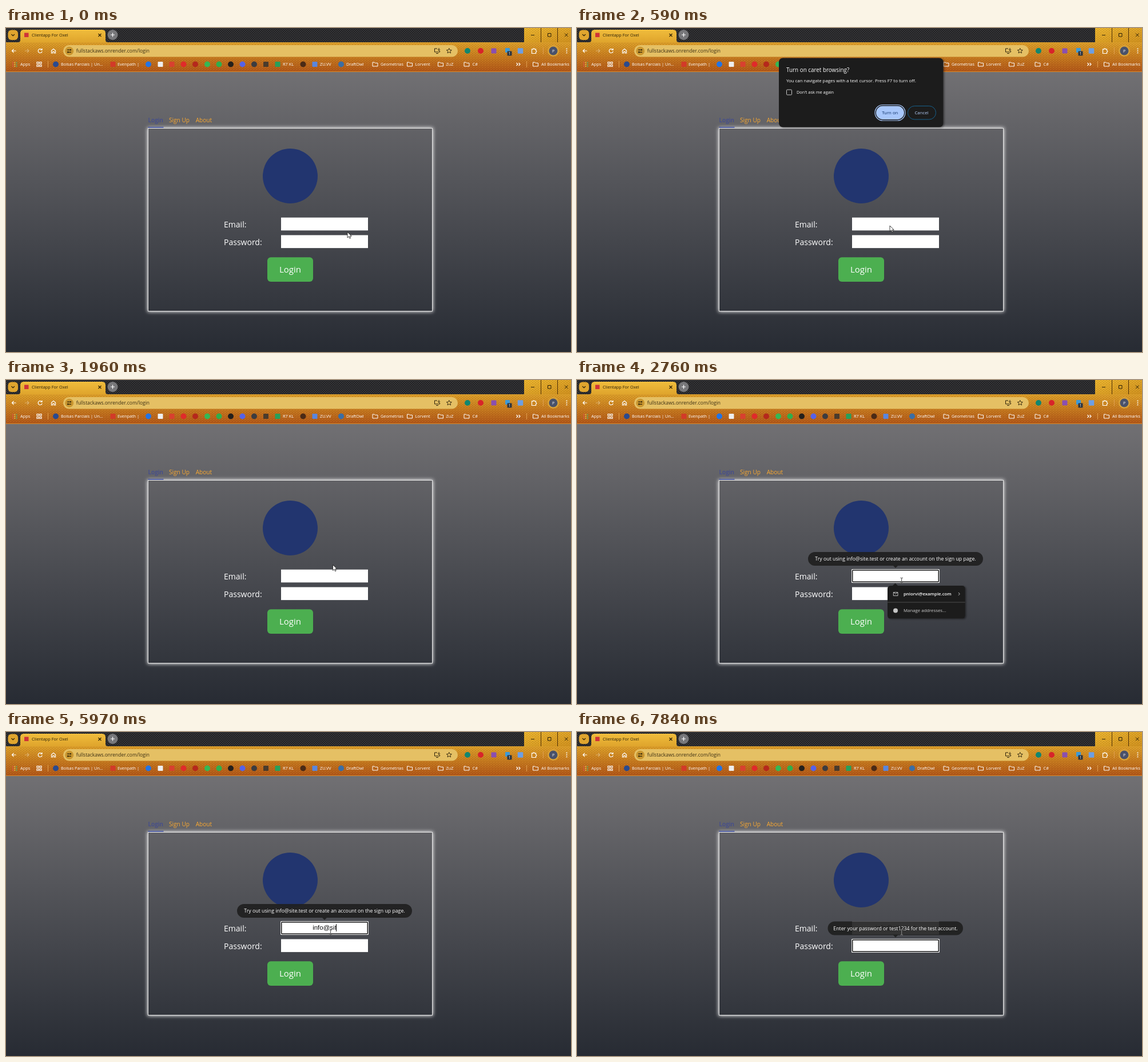
Write an HTML page that moves like this. It is 988 by 567 pixels and loops after 8000 ms.

```html
<!DOCTYPE html>
<html lang="en">
<head>
<meta charset="utf-8">
<title>Login form</title>
<style>
  html, body { margin: 0; width: 100%; height: 100%; overflow: hidden; background: #282c34; }
  svg { display: block; width: 988px; height: 567px; font-family: "Open Sans", "Noto Sans", sans-serif; fill: #fff; }
  .mid { text-anchor: middle; }
  .bar { font-size: 7.35px; font-weight: 500; }
  .line { fill: none; stroke: #fff; stroke-width: 1.2; }
  .ink { stroke: #2b2008; }
  .label { font-size: 14px; font-weight: 500; }
  .nav { font-size: 10.1px; fill: #fba930; font-weight: 500; }
  .tip { font-size: 8.75px; font-weight: 500; }
  .typed { font: 11.5px "Liberation Sans", Arial, sans-serif; fill: #111; }
  #beam { mix-blend-mode: difference; }
</style>
</head>
<body>
<svg viewBox="0 0 988 567">
  <defs>
    <linearGradient id="page" x2="0" y2="1"><stop stop-color="#717073"/><stop offset="1" stop-color="#272b33"/></linearGradient>
    <linearGradient id="gold" x2="0" y2="1"><stop stop-color="#dca02a"/><stop offset=".45" stop-color="#c87e20"/><stop offset="1" stop-color="#b05518"/></linearGradient>
    <linearGradient id="tab" x2="0" y2="1"><stop stop-color="#f0bd3c"/><stop offset="1" stop-color="#dfa42c"/></linearGradient>
    <linearGradient id="win" y2="1"><stop stop-color="#eab52f"/><stop offset="1" stop-color="#d0921f"/></linearGradient>
    <pattern id="weave" width="4" height="4" patternUnits="userSpaceOnUse">
      <rect width="4" height="4" fill="#29292b"/>
      <path d="M0 0h2v1h-2zM2 2h2v1h-2z" fill="#414144"/>
      <path d="M0 1h2v1h-2zM2 3h2v1h-2z" fill="#1b1b1d"/>
    </pattern>
    <pattern id="grain" width="5" height="4" patternUnits="userSpaceOnUse">
      <path d="M0 0h2v1h-2zM2.5 2h2v1h-2z" fill="#5a2600" fill-opacity=".2"/>
      <path d="M2 1h2v1h-2z" fill="#ffb040" fill-opacity=".15"/>
    </pattern>
    <clipPath id="outside"><path clip-rule="evenodd" d="M220 150H780V520H220zM249 176V495H745V176z"/></clipPath>
    <filter id="glow" x="-10%" y="-10%" width="120%" height="120%"><feGaussianBlur stdDeviation="3"/></filter>
    <filter id="shade" x="-10%" y="-10%" width="120%" height="125%"><feDropShadow dy="1" stdDeviation="1.5" flood-opacity=".4"/></filter>
    <path id="folder" d="M-4.5-3.5h3.3l1.2 1.3h4.5v5.7h-9z" class="line" style="stroke-width:1"/>
  </defs>

  <!-- page -->
  <rect y="77" width="988" height="490" fill="url(#page)"/>
  <g clip-path="url(#outside)">
    <rect x="247.5" y="174.5" width="499" height="322" filter="url(#glow)"/>
  </g>
  <rect x="248.5" y="175.5" width="497" height="320" class="line" style="stroke:#e6e6e6;stroke-width:1"/>
  <text class="nav" x="248.5" y="164.5" style="fill:#414b91;font-weight:600">Login</text>
  <text class="nav" x="285" y="164.5">Sign Up</text>
  <text class="nav" x="331.7" y="164.5">About</text>
  <rect x="248.5" y="173" width="27" height="1.5" fill="#33449a"/>
  <circle cx="497" cy="259" r="48" fill="#22356f"/>
  <text class="label" x="381" y="349">Email:</text>
  <text class="label" x="381" y="380">Password:</text>
  <rect x="481" y="331.7" width="152" height="22.6"/>
  <rect x="481" y="362.5" width="152" height="22.6"/>
  <g id="ring">
    <rect x="480" y="331" width="154" height="24" rx="1.5"/>
    <rect x="481.7" y="332.7" width="150.6" height="20.6" rx="1" stroke="#101010" stroke-width="1.5"/>
  </g>
  <text id="typed" class="typed mid" x="557" y="346.3"></text>
  <rect id="caret" width="1" height="13" fill="#111"/>
  <rect x="457" y="401.3" width="80" height="42.7" rx="6" fill="#4caf50"/>
  <text class="label mid" x="497" y="427.5" style="font-size:15px">Login</text>

  <!-- browser frame -->
  <rect width="988" height="25" fill="url(#weave)"/>
  <rect y="25" width="988" height="52" fill="url(#gold)"/>
  <rect y="25" width="988" height="52" fill="url(#grain)"/>
  <rect y="76" width="988" height="1" fill="#d88d30"/>
  <path d="M21 25q4 0 4-4V9q0-6 6-6H168q6 0 6 6V21q0 4 4 4z" fill="url(#tab)"/>
  <rect x="3.5" y="3.5" width="17.5" height="17.5" rx="6" fill="#e0a52e"/>
  <path d="M9.5 11l2.7 2.7 2.7-2.7" class="line ink"/>
  <rect x="32" y="8.5" width="7.5" height="7.5" fill="#cf3438"/>
  <text x="45" y="15.3" font-size="7.4" fill="#2b2008">Clientapp For Oxel</text>
  <path d="M161.5 10l5 5m0-5l-5 5" class="line ink"/>
  <circle cx="186.5" cy="12" r="9" fill="#77777a"/>
  <path d="M183 12h7m-3.5-3.5v7" class="line"/>
  <rect x="906" width="82" height="25" fill="url(#win)"/>
  <rect x="906" width="82" height="25" fill="url(#grain)"/>
  <path d="M935.5 0v25M964.5 0v25" stroke="#4f3006"/>
  <path d="M918 12.5h6M947.5 9.5h5.5v5.5h-5.5zM977 9.5l5.5 5.5m0-5.5l-5.5 5.5" class="line ink" style="stroke-width:1"/>

  <!-- toolbar -->
  <path d="M17.5 40h-7m3-3l-3 3 3 3" class="line"/>
  <path d="M33 40h7m-3-3l3 3-3 3" class="line" opacity=".35"/>
  <path d="M62.5 38a3.5 3.5 0 1 0 .6 3M63 35.8v2.7h-2.7" class="line"/>
  <path d="M79.5 39.5l3.5-3 3.5 3v4.5h-2.2v-2.7h-2.6v2.7h-2.2z" class="line"/>
  <rect x="100" y="30" width="690" height="20.5" rx="10.2" fill="#e5c064"/>
  <circle cx="110.7" cy="40.2" r="7.5" fill="#c9962f"/>
  <path d="M107 38.3h4m-3 4h6" class="line ink"/>
  <circle cx="112.8" cy="38.3" r="1.3" fill="#2b2008"/>
  <circle cx="108.3" cy="42.3" r="1.3" fill="#2b2008"/>
  <text x="122.8" y="43.3" font-size="8.45" fill="#3b2e14">fullstackaws.onrender.com/login</text>
  <path d="M754 36h-4.5v6h9v-2M752 44.5h4M757 35v4.5m-2-2l2 2 2-2" class="line ink" style="stroke-width:1"/>
  <path d="M774.8 35.5l1.3 2.9 3.2.3-2.4 2.1.7 3.1-2.8-1.7-2.8 1.7.7-3.1-2.4-2.1 3.2-.3z" class="line ink" style="stroke-width:.9"/>
  <path d="M919.5 37.2h2.2a1.3 1.3 0 0 1 2.6 0h2.2v2.3a1.3 1.3 0 0 1 0 2.6v2.4h-7z" class="line"/>
  <path d="M939.5 34v12" stroke="#e0a050"/>
  <circle cx="957" cy="40" r="10" fill="#d9a238"/>
  <circle cx="957" cy="40" r="7.5" fill="#49516a"/>
  <text class="mid" x="957" y="42.7" font-size="7">P</text>
  <circle cx="980.5" cy="36.5" r="1"/>
  <circle cx="980.5" cy="40" r="1"/>
  <circle cx="980.5" cy="43.5" r="1"/>
  <g id="bar" class="bar"></g>

  <!-- overlays -->
  <g id="drop">
    <path d="M551.5 360.5l5-5 5 5z" fill="#1f1f1f"/>
    <rect x="543" y="360" width="135.7" height="57.6" rx="5" fill="#1f1f1f" filter="url(#shade)"/>
    <path d="M543 389h135.7" stroke="#4c4c4c"/>
    <path d="M553.3 371.5h7.7v6h-7.7zl3.85 3 3.85-3" class="line" style="stroke:#ccc;stroke-width:.9"/>
    <text x="571" y="377.4" font-size="7.8" font-weight="600">pnlorvi@example.com</text>
    <path d="M667 372l2.3 2.4-2.3 2.4" class="line" style="stroke:#ccc;stroke-width:1"/>
    <circle cx="557" cy="403.5" r="4" fill="#c4c4c4"/>
    <text x="571" y="406.3" font-size="7.8" fill="#ccc">Manage addresses...</text>
  </g>
  <g id="tipEmail" class="tip">
    <path d="M416 301H698a12 12 0 0 1 0 24H561l-4 4-4-4H416a12 12 0 0 1 0-24z" fill="#1f1f1f" fill-opacity=".91"/>
    <text class="mid" x="557" y="316">Try out using info@site.test or create an account on the sign up page.</text>
  </g>
  <g id="tipPass" class="tip">
    <path d="M450.5 331.5H663a12 12 0 0 1 0 24H561l-4 4-4-4H450.5a12 12 0 0 1 0-24z" fill="#1f1f1f" fill-opacity=".91"/>
    <text class="mid" x="557" y="346.5">Enter your password or test1234 for the test account.</text>
  </g>
  <g id="dialog">
    <rect x="353" y="52.5" width="287.5" height="121" rx="7" fill="#1f1f1f" filter="url(#shade)"/>
    <text x="366" y="77" font-size="9.9" font-weight="500">Turn on caret browsing?</text>
    <text x="366" y="95.3" font-size="7.87">You can navigate pages with a text cursor. Press F7 to turn off.</text>
    <rect x="366.5" y="108" width="9" height="9" rx="1.2" class="line" style="stroke:#c7c7c7;stroke-width:1"/>
    <text x="384" y="115.2" font-size="7.35">Don't ask me again</text>
    <rect x="521" y="134.5" width="53" height="27.5" rx="13.7" class="line" style="stroke:#a8c7fa"/>
    <rect x="523" y="136.5" width="49" height="23.5" rx="11.7" fill="#a8c7fa"/>
    <text class="mid" x="547.3" y="151.2" font-size="7.8" fill="#0b2f66">Turn on</text>
    <rect x="578.5" y="136.5" width="49" height="23.5" rx="11.7" class="line" style="stroke:#17608c;stroke-width:1"/>
    <text class="mid" x="602.5" y="151.2" font-size="7.8" fill="#b5cffb">Cancel</text>
  </g>
  <path id="arrow" d="M0 0v10l2.4-2.2 1.6 3.5 1.7-.8-1.6-3.3h3.2z" stroke="#111" stroke-width=".8"/>
  <path id="beam" d="M565.5 346.3h1.3l.9.6.9-.6h1.3M567.7 346.7v8M565.5 355.1h1.3l.9-.6.9.6h1.3" class="line" style="stroke:#c4c4c4;stroke-width:1"/>
</svg>
<script>
const LOOP = 8000;
const $ = id => document.getElementById(id);

// Bookmark bar: discs and squares [x, colour], captions [x, text], folders [x]
const discs = [[87, '#2b4a8e'], [249, '#2274e5'], [310.5, '#e02a2a'], [331, '#b5281c'], [352, '#35b855'],
  [372.5, '#2fae4c'], [393, '#24201c'], [413.5, '#5562e8'], [434, '#3c3c40'], [519.5, '#4a2a16'], [586, '#3b6ea5']];
const squares = [[187, '#d23a28'], [270, '#eeeeee'], [290, '#d8402f'], [454.5, '#4a3b2c'], [475, '#27a05b'], [540, '#5a86dc']];
const captions = [[25, 'Apps'], [96, 'Bolsas Parciais | Un...'], [195, 'Evenpath |'], [484, 'R7 KL'], [549, 'ZU.VV'],
  [595, 'DraftOwl'], [655, 'Geometrias'], [715.5, 'Lorvent'], [769.5, 'ZuZ'], [815.5, 'C#'], [936, 'All Bookmarks']];
const folders = [645.5, 706, 760, 805.5, 926];

const disc = (x, y, r, fill) => `<circle cx="${x}" cy="${y}" r="${r}" fill="${fill}"/>`;
const square = (x, y, s, fill) => `<rect x="${x - s / 2}" y="${y - s / 2}" width="${s}" height="${s}" rx="1" fill="${fill}"/>`;
const appDots = [...Array(9).keys()].map(i =>
  disc(12 + i % 3 * 3.3, 60.5 + Math.floor(i / 3) * 3.3, 1.1, ['#e2574c', '#e8c34a', '#58b368'][i % 3]));

$('bar').innerHTML = [
  ...appDots,
  ...discs.map(([x, fill]) => disc(x, 63.5, 5, fill)),
  ...squares.map(([x, fill]) => square(x, 63.5, 9, fill)),
  ...captions.map(([x, text]) => `<text x="${x}" y="66.2">${text}</text>`),
  ...folders.map(x => `<use href="#folder" x="${x}" y="63.5"/>`),
  '<path class="line" d="M54 59.5h3v3h-3zm5 0h3v3h-3zm-5 5h3v3h-3zm5 0h3v3h-3zM892.5 61l2.5 2.5-2.5 2.5m4-5l2.5 2.5-2.5 2.5"/>',
  '<path d="M73.5 58v11M910.5 58v11" stroke="#e0a050"/>',
  disc(807, 40, 5, '#11866f'), disc(830, 40, 5, '#d8232a'), square(853, 40, 9, '#8a4fb0'),
  square(877, 39, 8, '#3c9ad8'), square(899.5, 40, 9.5, '#6c9fe6'),
  square(880.5, 44.5, 8, '#2c3540'), '<text class="mid" x="880.5" y="47" font-size="6.5">1</text>'
].join('');

const EMAIL = 'info@site.test';
// [time, letters typed]
const keys = [[0, 0], [2960, 1], [3100, 2], [3300, 3], [3500, 4], [4710, 5], [5700, 6], [5770, 7],
  [5970, 8], [6040, 9], [6900, 10], [7030, 11], [7170, 12], [7230, 14]];
// [time, caret shown]
const blinks = [[0, 0], [2230, 1], [2760, 0], [2960, 1], [4030, 0], [4580, 1], [5240, 0], [5700, 1],
  [6570, 0], [6900, 1], [7840, 0]];
// [time, x, y]
const pointer = [[0, 597, 357], [70, 597, 357], [430, 547, 346], [600, 547, 346], [860, 596, 184],
  [1060, 604, 155], [1500, 604, 155], [1750, 592, 222], [2040, 567, 346]];

const HOVER = 2000, FOCUS = 2230, TAB = 7300;

const stepAt = (table, t) => table.findLast(row => row[0] <= t)[1];
const ramp = (t, from, to) => Math.min(1, Math.max(0, (t - from) / (to - from)));
const show = (id, amount) => $(id).setAttribute('opacity', +amount);

function pointerAt(t) {
  const i = pointer.findLastIndex(p => p[0] <= t);
  const a = pointer[i], b = pointer[i + 1] || a;
  const k = b === a ? 0 : ramp(t, a[0], b[0]), ease = k * k * (3 - 2 * k);
  return [a[1] + (b[1] - a[1]) * ease, a[2] + (b[2] - a[2]) * ease];
}

function draw(t) {
  const inPassword = t >= TAB;
  $('typed').textContent = EMAIL.slice(0, stepAt(keys, t));
  const half = inPassword ? 0 : $('typed').getComputedTextLength() / 2;
  $('caret').setAttribute('x', Math.round(556 + half));
  $('caret').setAttribute('y', inPassword ? 367 : 336);
  show('caret', stepAt(blinks, t));
  show('ring', t >= FOCUS);
  $('ring').setAttribute('transform', `translate(0 ${inPassword ? 31 : 0})`);

  show('dialog', ramp(t, 200, 340) - ramp(t, 1150, 1330));
  show('tipEmail', ramp(t, 2040, 2190) - ramp(t, TAB, 7450));
  show('tipPass', ramp(t, TAB, 7500));
  show('drop', ramp(t, FOCUS, 2300) - ramp(t, 2960, 3100));

  $('arrow').setAttribute('transform', `translate(${pointerAt(t)})`);
  show('arrow', t < HOVER);
  show('beam', t >= HOVER);
}

const start = performance.now();
function tick() {
  draw((performance.now() - start) % LOOP);
  requestAnimationFrame(tick);
}
tick();
</script>
</body>
</html>
```
